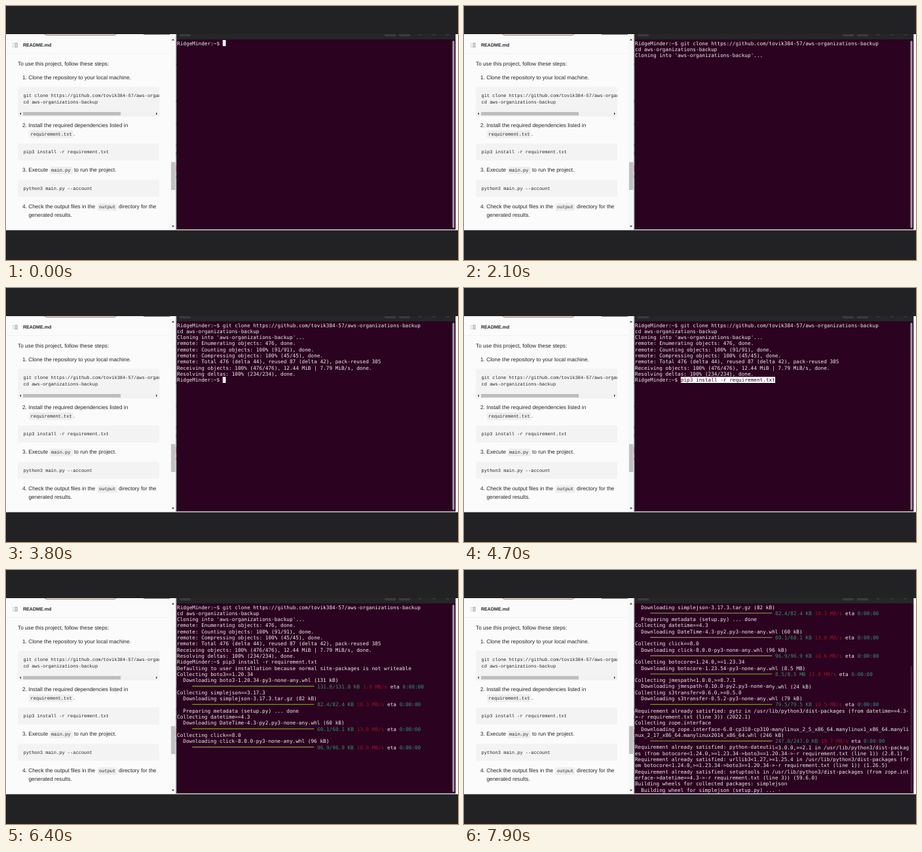
Animation of 690 by 388 pixels, one loop 8 s. Source, as an HTML page:

```html
<!DOCTYPE html>
<html lang="en">
<head>
<meta charset="utf-8">
<title>Terminal walkthrough</title>
<style>
html, body { margin: 0; width: 690px; height: 388px; overflow: hidden; background: #222224; }
svg { display: block; }
text { white-space: pre; text-rendering: geometricPrecision; }
.page { font: 8.27px "Liberation Sans", Arial, sans-serif; fill: #24262a; }
.code { font: 7.02px "Liberation Mono", "Courier New", monospace; fill: #24262a; }
#term { font: 7.73px "DejaVu Sans Mono", monospace; fill: #f0edf0; }
.block { fill: #f3f3f4; }
.pill { fill: #eeeeef; }
</style>
</head>
<body>
<svg width="690" height="388" viewBox="0 0 690 388">
  <clipPath id="gitClip"><rect x="18" y="123" width="216" height="46"/></clipPath>
  <rect width="690" height="388" fill="#222224"/>
  <rect y="43" width="690" height="299.5" fill="#fbfbfb"/>

  <!-- README panel -->
  <path d="M59 43q1 1.6 4 1.6H164q3 0 4-1.6" fill="none" stroke="#a5694f"/>
  <path d="M210 43.4H250" stroke="#777"/>
  <path d="M0 72.5H250" stroke="#ececec" stroke-width=".6"/>
  <path d="M13 57.2h5M13 59.8h5M13 62.4h5M10.3 57.2h1M10.3 59.8h1M10.3 62.4h1" stroke="#666" stroke-width=".8"/>
  <g class="block">
    <rect x="18" y="123.5" width="216" height="45" rx="2.5"/>
    <rect x="18" y="210" width="216" height="26" rx="2.5"/>
    <rect x="18" y="265.5" width="216" height="26" rx="2.5"/>
  </g>
  <rect x="18" y="161" width="216" height="7.5" fill="#f1f1f1"/>
  <rect x="26" y="162" width="149" height="5.2" fill="#bdbdbd"/>
  <path d="M23 162.5v4l-2.2-2zM229 162.5v4l2.2-2z" fill="#444"/>
  <g class="pill">
    <rect x="35" y="190" width="67.5" height="11.5" rx="2.5"/>
    <rect x="66.5" y="245.5" width="35.5" height="11.5" rx="2.5"/>
    <rect x="139.5" y="301.5" width="30" height="11.5" rx="2.5"/>
  </g>
  <g class="page">
    <text x="26" y="62" font-weight="bold" font-size="7.1">README.md</text>
    <text x="18" y="91.2">To use this project, follow these steps:</text>
    <text x="25" y="111.6">1. Clone the repository to your local machine.</text>
    <text x="25" y="185.4">2. Install the required dependencies listed in</text>
    <text x="103" y="198.4">.</text>
    <text x="25" y="253.4">3. Execute</text>
    <text x="104" y="253.4">to run the project.</text>
    <text x="25" y="309.4">4. Check the output files in the</text>
    <text x="172" y="309.4">directory for the</text>
    <text x="34.5" y="321.6">generated results.</text>
  </g>
  <g class="code">
    <g clip-path="url(#gitClip)">
      <text x="26.5" y="138.8">git clone https://github.com/tovik384-57/aws-organizations-backup</text>
    </g>
    <text x="26.5" y="149.2">cd aws-organizations-backup</text>
    <text x="37.5" y="198.2">requirement.txt</text>
    <text x="26.5" y="224.9">pip3 install -r requirement.txt</text>
    <text x="69" y="253.4">main.py</text>
    <text x="26.5" y="280.6">python3 main.py --account</text>
    <text x="142" y="309.4">output</text>
  </g>
  <rect x="250.5" y="46" width="8.5" height="296" fill="#f7f7f7"/>
  <rect x="252" y="238.5" width="6.5" height="42.5" fill="#c1c1c1"/>
  <path d="M252.8 52.5h4.4l-2.2-2.4zM252.8 335.5h4.4l-2.2 2.4z" fill="#444"/>
  <rect x="259" y="43" width="1.5" height="299" fill="#a8a8a8"/>
  <path d="M259.8 88v2M259.8 144v3M259.8 180v2M259.8 211v4M259.8 223v5M259.8 259v4" stroke="#777"/>
  <path d="M259.8 243v10" stroke="#c8565a"/>
  <g id="copy" fill="none">
    <rect x="212.5" y="-9" width="17.5" height="18" rx="3" fill="#f3f3f4" stroke="#d3d3d6" stroke-width=".8"/>
    <path d="M219.8-3.8h5v5h-5zM219.8-1.3h-2.3v5h5v-2.5" stroke="#555" stroke-width=".8"/>
  </g>

  <!-- Terminal window -->
  <rect x="260.3" y="43" width="426" height="8" fill="#262527"/>
  <g fill="#3b3a3d">
    <rect x="265" y="41" width="17" height="5.5" rx="1.5"/>
    <rect x="578" y="41" width="17" height="5.5" rx="1.5"/>
    <rect x="600" y="41" width="17" height="5.5" rx="1.5"/>
    <circle cx="632" cy="42.5" r="2.5"/><circle cx="653" cy="42.5" r="2.5"/><circle cx="674" cy="42.5" r="2.5"/>
  </g>
  <rect width="690" height="43" fill="#222224"/>
  <rect x="260.3" y="51" width="426" height="290.3" fill="#2b021f"/>
  <rect id="thumb" x="681.5" width="3" rx="1.5" fill="#a39aa1"/>
  <!-- The slight turn keeps baselines from snapping to whole pixels. -->
  <g id="term" transform="rotate(.02 470 195)"></g>
</svg>
<script>
const LOOP = 8000, ROWS = 31, LEFT = 261, TOP = 52, PITCH = 9.3, CHAR = 4.653;
const PAPER = '#2b021f';
const prompt = 'RidgeMinder:~$ ';
const clone = 'git clone https://github.com/tovik384-57/aws-organizations-backup';
const enter = 'cd aws-organizations-backup';
const install = 'pip3 install -r requirement.txt';

// Rows starting with | are finished download bars: size, then speed.
const log = `${prompt}${clone}
${enter}
Cloning into 'aws-organizations-backup'...
remote: Enumerating objects: 476, done.
remote: Counting objects: 100% (91/91), done.
remote: Compressing objects: 100% (45/45), done.
remote: Total 476 (delta 44), reused 87 (delta 42), pack-reused 385
Receiving objects: 100% (476/476), 12.44 MiB | 7.79 MiB/s, done.
Resolving deltas: 100% (234/234), done.
${prompt}${install}
Defaulting to user installation because normal site-packages is not writeable
Collecting boto3==1.20.34
  Downloading boto3-1.20.34-py3-none-any.whl (131 kB)
|131.8/131.8 KB|1.9 MB/s
Collecting simplejson==3.17.3
  Downloading simplejson-3.17.3.tar.gz (82 kB)
|82.4/82.4 KB|10.3 MB/s
  Preparing metadata (setup.py) ... done
Collecting datetime==4.3
  Downloading DateTime-4.3-py2.py3-none-any.whl (60 kB)
|60.1/60.1 KB|13.0 MB/s
Collecting click==8.0
  Downloading click-8.0.0-py3-none-any.whl (96 kB)
|96.9/96.9 KB|10.6 MB/s
Collecting botocore<1.24.0,>=1.23.34
  Downloading botocore-1.23.54-py3-none-any.whl (8.5 MB)
|8.5/8.5 MB|11.8 MB/s
Collecting jmespath<1.0.0,>=0.7.1
  Downloading jmespath-0.10.0-py2.py3-none-any.whl (24 kB)
Collecting s3transfer<0.6.0,>=0.5.0
  Downloading s3transfer-0.5.2-py3-none-any.whl (79 kB)
|79.5/79.5 KB|10.5 MB/s
Requirement already satisfied: pytz in /usr/lib/python3/dist-packages (from datetime==4.3-
>-r requirement.txt (line 3)) (2022.1)
Collecting zope.interface
  Downloading zope.interface-6.0-cp310-cp310-manylinux_2_5_x86_64.manylinux1_x86_64.manyli
nux_2_17_x86_64.manylinux2014_x86_64.whl (246 kB)
|247.0/247.0 KB|19.7 MB/s
Requirement already satisfied: python-dateutil<3.0.0,>=2.1 in /usr/lib/python3/dist-packag
es (from botocore<1.24.0,>=1.23.34->boto3==1.20.34->-r requirement.txt (line 1)) (2.8.1)
Requirement already satisfied: urllib3<1.27,>=1.25.4 in /usr/lib/python3/dist-packages (fr
om botocore<1.24.0,>=1.23.34->boto3==1.20.34->-r requirement.txt (line 1)) (1.26.5)
Requirement already satisfied: setuptools in /usr/lib/python3/dist-packages (from zope.int
erface->datetime==4.3->-r requirement.txt (line 3)) (59.6.0)
Building wheels for collected packages: simplejson
  Building wheel for simplejson (setup.py) ... -`.split('\n');

// [time, rows printed so far]
const steps = [[0, 0], [1800, 3], [2500, 4], [2700, 6], [3300, 9], [4900, 10], [5200, 11],
  [5500, 12], [5600, 14], [5900, 18], [6100, 21], [6300, 24], [6500, 26], [6800, 27], [6900, 29],
  [7000, 32], [7100, 34], [7300, 35], [7400, 38], [7500, 40], [7600, 42], [7700, 44], [7800, 46]];

const $ = id => document.getElementById(id);
const escape = s => s.replace(/&/g, '&amp;').replace(/</g, '&lt;');
const colX = col => LEFT + col * CHAR;
const rowY = row => TOP + row * PITCH;

function put(row, col, str, color = '#f0edf0') {
  return `<text x="${colX(col)}" y="${rowY(row) + 7.6}" fill="${color}">${escape(str)}</text>`;
}

function inverse(row, col, str) {
  return `<rect x="${colX(col)}" y="${rowY(row)}" width="${str.length * CHAR}" height="${PITCH}" fill="#fff"/>`
    + put(row, col, str, PAPER);
}

function bar(row, size, speed) {
  const after = 47 + size.length, eta = after + speed.length + 1;
  return `<rect x="${colX(5)}" y="${rowY(row) + 3.9}" width="${40 * CHAR}" height="1.4" fill="#7f8b3a"/>`
    + put(row, 46, size, '#35906f') + put(row, after, speed, '#94182f')
    + put(row, eta, 'eta') + put(row, eta + 4, '0:00:00', '#358f8c');
}

function receiving(t) {
  const p = Math.min(1, (t - 2750) / 350) * 0.942;
  const percent = String(Math.floor(p * 100)).padStart(3);
  const size = (p / 0.942 * 6.61).toFixed(2);
  return `Receiving objects: ${percent}% (${Math.round(p * 476)}/476), ${size} MiB | 6.51 MiB/s`;
}

function draw(t) {
  const count = steps.filter(s => s[0] <= t).pop()[1];
  const total = Math.min(count + 1, log.length);
  const first = Math.max(0, total - ROWS);
  let out = '';
  for (let i = first; i < count; i++) {
    const row = i - first, line = log[i];
    out += line[0] === '|' ? bar(row, ...line.slice(1).split('|')) : put(row, 0, line);
  }
  if (count === 0) {
    out += put(0, 0, prompt);
    out += t < 1400 ? inverse(0, 15, ' ') : inverse(0, 15, clone) + inverse(1, 0, enter);
  } else if (count === 6 && t >= 2750) {
    const line = receiving(t);
    out += inverse(6, 0, line[0]) + put(6, 1, line.slice(1));
  } else if (count === 9) {
    out += put(9, 0, prompt) + inverse(9, 15, t < 4300 ? ' ' : install);
  }
  $('term').innerHTML = out;

  const top = 53 + 287 * first / total;
  $('thumb').setAttribute('y', top);
  $('thumb').setAttribute('height', 339 - top);
  $('thumb').setAttribute('opacity', t < 7500 ? 1 : 0.2);

  const hover = t >= 2900 && t < 3700 ? 222.5 : t >= 6900 && t < 7600 ? 278.5 : 0;
  $('copy').setAttribute('transform', `translate(0 ${hover})`);
  $('copy').setAttribute('visibility', hover ? 'visible' : 'hidden');
}

const start = performance.now();
function tick() {
  draw((performance.now() - start) % LOOP);
  requestAnimationFrame(tick);
}
tick();
</script>
</body>
</html>
```
